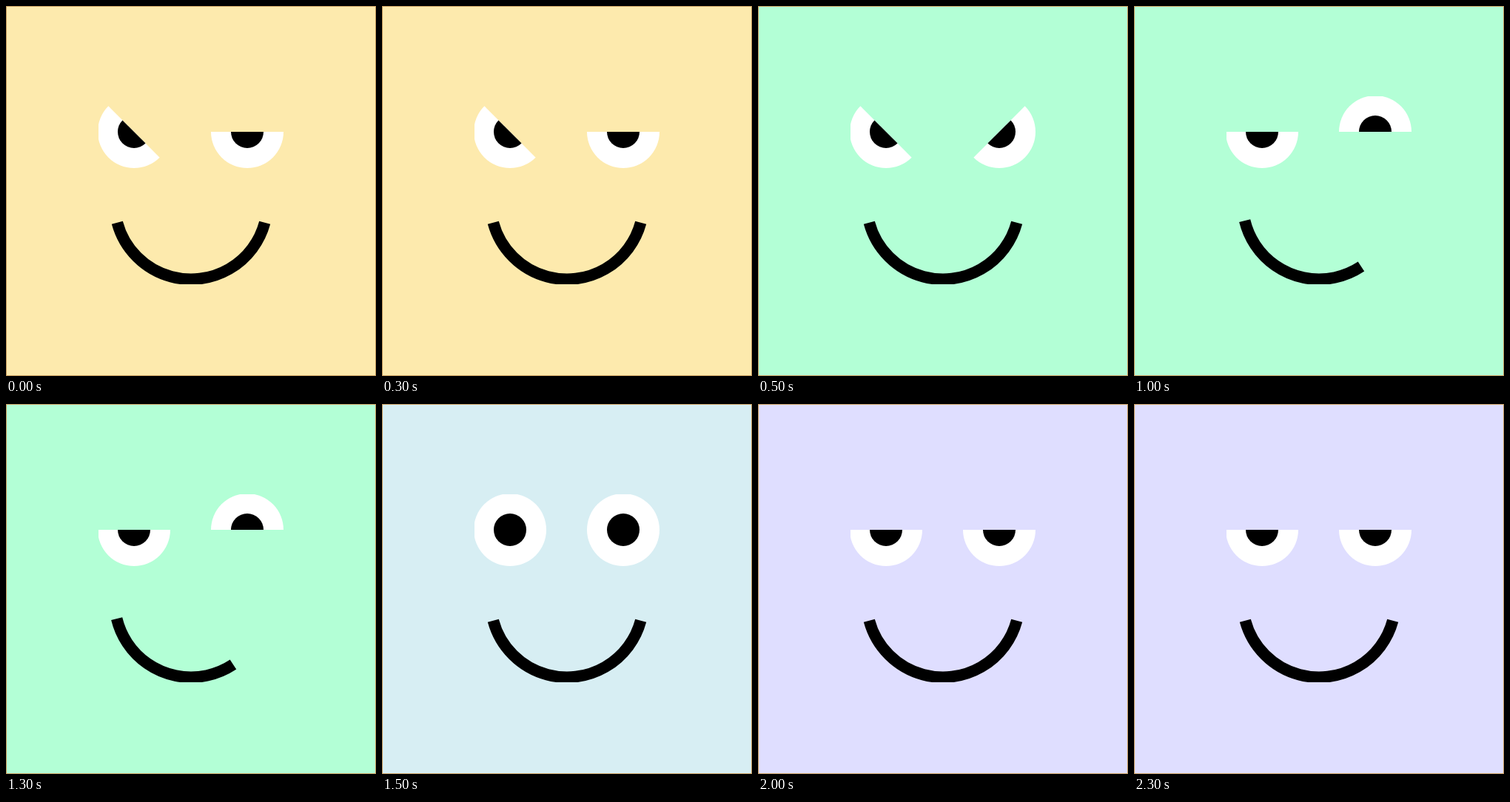
An HTML page with a canvas for the animation above (2500 ms loop, 500 px wide and 500 px high).

```html
<!DOCTYPE html>
<html lang="en">
<head>
<meta charset="utf-8">
<title>Moody face</title>
<style>
  html, body { margin: 0; width: 100%; height: 100%; overflow: hidden; }
  canvas { display: block; }
</style>
</head>
<body>
<canvas id="stage" width="500" height="500"></canvas>
<script>
const ctx = document.getElementById('stage').getContext('2d');
const HOLD = 500;

// Arcs are [start, end] in degrees, clockwise from the right.
const FULL = [0, 360], LOWER = [0, 180], UPPER = [180, 360];
const ANGRY_LEFT = [45, 225], ANGRY_RIGHT = [-45, 135];
const SMILE = [15, 165], SMIRK = [56.5, 166.5];

const moods = [
  { back: '#fdeaad', left: ANGRY_LEFT, right: LOWER, mouth: SMILE },
  { back: '#b3ffd6', left: ANGRY_LEFT, right: ANGRY_RIGHT, mouth: SMILE },
  { back: '#b3ffd6', left: LOWER, right: UPPER, mouth: SMIRK },
  { back: '#d7eef3', left: FULL, right: FULL, mouth: SMILE },
  { back: '#dfdeff', left: LOWER, right: LOWER, mouth: SMILE }
];

function arc(x, y, radius, [start, end]) {
  ctx.beginPath();
  ctx.arc(x, y, radius, start * Math.PI / 180, end * Math.PI / 180);
}

function disc(x, y, radius, span, color) {
  arc(x, y, radius, span);
  ctx.fillStyle = color;
  ctx.fill();
}

function eye(x, span) {
  disc(x, 170, 49, span, '#fff');
  disc(x, 170, 22, span, '#000');
}

function draw({ back, left, right, mouth }) {
  ctx.fillStyle = '#c4985a';
  ctx.fillRect(0, 0, 500, 500);
  ctx.fillStyle = back;
  ctx.fillRect(1, 1, 498, 498);

  // The face is cropped slightly by its bounding box.
  ctx.save();
  ctx.beginPath();
  ctx.rect(125, 122, 250, 254);
  ctx.clip();
  eye(173, left);
  eye(326, right);
  arc(250, 266, 103.2, mouth);
  ctx.lineWidth = 15.5;
  ctx.strokeStyle = '#000';
  ctx.stroke();
  ctx.restore();
}

function tick() {
  draw(moods[Math.floor(performance.now() / HOLD) % moods.length]);
  requestAnimationFrame(tick);
}
tick();
</script>
</body>
</html>
```
